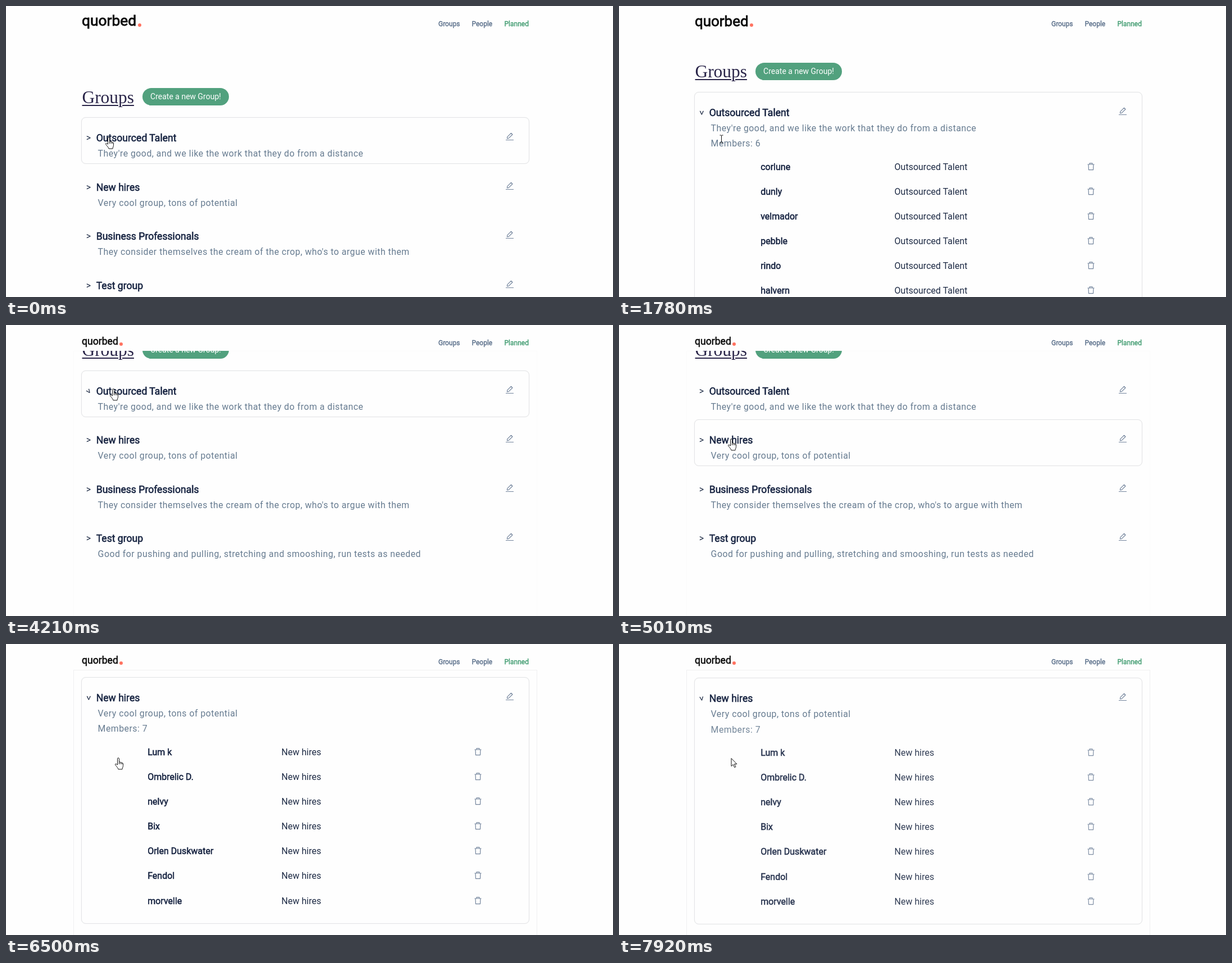
Animation, 1081 px wide and 518 px high, one loop 8 s. Source, as an HTML page:

```html
<!DOCTYPE html>
<html lang="en">
<head>
<meta charset="utf-8">
<title>Groups</title>
<style>
  html, body { margin: 0; width: 100%; height: 100%; overflow: hidden; background: #fefefe; }
  body { position: relative; font: 16px Roboto, sans-serif; color: #1e2b45; }
  body * { position: absolute; white-space: nowrap; box-sizing: border-box; }
  .text { line-height: 20px; margin-top: -10px; }
  .bold { -webkit-text-stroke: .032em currentColor; }
  svg { overflow: visible; fill: none; }

  header { left: 0; top: 0; width: 100%; height: 46px; background: #fefefe; }
  #logo { left: 135px; top: 35.5px; line-height: 0; color: #0a0a0a; }
  #logo span { position: relative; top: -.342em; }
  #logo i { left: calc(100% + 2.5px); top: -5px; width: 6px; height: 6px; border-radius: 50%; background: #ff7361; }
  nav .text { top: 31.5px; font-size: 12px; color: #5a6f8a; }
  nav .text:last-child { color: #3f9b6f; }

  #frame { left: 120px; top: 46px; width: 826px; height: 500px; border: 1px solid #f0f0f1; }
  #page { left: 0; width: 100%; }
  h1 { left: 135.5px; top: 162.5px; margin: -20px 0 0; font: 31.4px/40px "Liberation Serif", serif; color: #2a2549;
       text-decoration: underline 2px; text-underline-offset: 3px; }
  #create { left: 243px; top: 146px; width: 154px; height: 31px; border-radius: 16px; background: #52a17e;
            color: #fff; font-size: 14px; line-height: 30px; text-align: center; }
  .group { left: 134px; width: 798px; border: 1px solid transparent; border-radius: 8px; }
  .group.hover { background: #fefefe; border-color: #e3e4e6; box-shadow: 0 0 2px rgba(0, 0, 0, .05); }
  .group.raised { box-shadow: 0 0 5px rgba(0, 0, 0, .22); }
  .mark { width: 10px; text-align: center; }
  .title { font-size: 17.6px; color: #14213f; }
  .note { font-size: 15.84px; letter-spacing: .5px; color: #667b90; }
  .name { color: #14213f; }
  .icon { stroke: #74859d; stroke-width: 1.2; stroke-linejoin: round; }
</style>
</head>
<body>
<div id="frame"></div>
<main id="page"><h1>Groups</h1><div id="create">Create a new Group!</div></main>
<header>
  <div id="logo"><span class="bold">quorbed</span><i></i></div>
  <nav>
    <div class="text bold" style="left:770px">Groups</div>
    <div class="text bold" style="left:829.5px">People</div>
    <div class="text bold" style="left:887.5px">Planned</div>
  </nav>
</header>
<svg id="pointer" width="1" height="1" stroke="#111"><path/></svg>

<script>
const LOOP = 8000, TOP = 198, ROW = 44.1, CLOSED = 83, GAP = 4.5, NOTCH = 58.7;
const $ = id => document.getElementById(id);

// Groups with members open and close at the given times.
const groups = [
  { title: "Outsourced Talent", note: "They're good, and we like the work that they do from a distance",
    members: ["corlune", "dunly", "velmador", "pebble", "rindo", "halvern"], opens: 830, closes: 4210 },
  { title: "New hires", note: "Very cool group, tons of potential",
    members: ["Lum k", "Ombrelic D.", "nelvy", "Bix", "Orlen Duskwater", "Fendol", "morvelle"], opens: 5440, closes: LOOP },
  { title: "Business Professionals", note: "They consider themselves the cream of the crop, who's to argue with them" },
  { title: "Test group", note: "Good for pushing and pulling, stretching and smooshing, run tests as needed" },
];

const icons = {
  pencil: "M1 13.5h14M3.4 11l.5-3.2L10.4 1.3l2.6 2.5L6.3 10.4Z",
  trash: "M.5 3h12M4 3V.9h5V3M2 3l.5 9.6h8L11 3",
};
const pointers = {
  hand: "M-1.5 12V1.3a1.5 1.5 0 0 1 3 0V7.5a1.5 1.5 0 0 1 2.6.6 1.4 1.4 0 0 1 2.4.8 1.3 1.3 0 0 1 2 1.1V13.5"
      + "c0 3-1.5 4-1.5 6.5H0C-.5 17.5-3 15.5-5.3 12.1c-.8-1.4.8-2.4 2-1.3ZM1.5 7.5V11M4.1 8.1V11M6.5 8.9V11",
  arrow: "M0 .5v14l3.3-3 2.4 5.2 2.2-1-2.4-5h4.4Z",
  beam: "M-1.5-6H.8l.7.7.7-.7H4.5M1.5-5.3V6.7M-1.5 7.4H.8l.7-.7.7.7H4.5",
};

const wheelDown = [1700, 2070, 6000, 6400, 6520];
const wheelUp = [7700, 7910];
const path = [[0, 183, 233.5], [120, 180.5, 235.5], [2650, 180.5, 235.5], [3110, 190.5, 114],
              [4350, 190.5, 114], [4610, 163.5, 203], [4750, 186, 216], [5010, 199.5, 202.5]];

const ramp = (t, start, length) => Math.min(1, Math.max(0, (t - start) / length));
const smooth = u => u * u * (3 - 2 * u);
const wheel = (times, t) => times.reduce((sum, start) => sum + 1 - (1 - ramp(t, start, 260)) ** 4, 0);

function pointerAt(t) {
  const i = path.findLastIndex(p => p[0] <= t);
  const [start, x, y] = path[i], [end, nextX, nextY] = path[i + 1] || [LOOP, x, y];
  const u = smooth(ramp(t, start, end - start));
  return [x + (nextX - x) * u, y + (nextY - y) * u];
}

function pointerKind(t) {
  if (t >= 1780 && t < 1910) return "beam";
  return t < 1780 || (t > 2900 && t < 7010) ? "hand" : "arrow";
}

const text = (cls, str, left, top) =>
  `<div class="text ${cls}" style="left:${left}px;top:${top}px">${str}</div>`;
const icon = (kind, left, top) =>
  `<svg class="icon" width="16" height="16" style="left:${left}px;top:${top}px"><path d="${icons[kind]}"/></svg>`;

function memberRows({ title, members = [] }) {
  return text("note", `Members: ${members.length}`, 28.6, 91.5) + members.map((name, i) => {
    const y = 133 + i * ROW;
    return text("name bold", name, 117.2, y) + text("", title, 355.6, y) + icon("trash", 698.5, y - 8);
  }).join("");
}

for (const group of groups) {
  const el = group.el = document.createElement("section");
  el.className = "group";
  el.innerHTML = text("mark", "&gt;", 7, 36) + text("title bold", group.title, 25.7, 36)
    + text("note", group.note, 28.6, 64) + icon("pencil", 754, 26)
    + `<div class="members">${memberRows(group)}</div>`;
  group.mark = el.querySelector(".mark");
  group.list = el.querySelector(".members");
  $("page").append(el);
}

function draw(t) {
  const scroll = NOTCH * (wheel(wheelDown, t) - wheel(wheelUp, t));
  $("page").style.top = -scroll + "px";
  $("logo").style.fontSize = 26.4 - 8.8 * smooth(ramp(t, 1690, 660)) + "px";
  $("frame").style.opacity = .3 * ramp(t, 2050, 250) + .7 * ramp(t, 5800, 100);

  const [x, y] = pointerAt(t), kind = pointerKind(t), shape = $("pointer").firstElementChild;
  $("pointer").style.left = x + "px";
  $("pointer").style.top = y + "px";
  shape.setAttribute("d", pointers[kind]);
  shape.setAttribute("fill", kind === "beam" ? "none" : "#fff");

  let top = TOP;
  for (const { el, mark, list, members, opens, closes } of groups) {
    const open = t >= opens && t < closes;
    const turn = members ? ramp(t, opens - 100, 250) - ramp(t, closes - 100, 250) : 0;
    const height = CLOSED + (open ? 47.5 + ROW * members.length : 0);
    const hover = y + scroll >= top && y + scroll < top + height;
    el.style.top = top + "px";
    el.style.height = height + "px";
    el.classList.toggle("hover", hover);
    el.classList.toggle("raised", hover && t > opens + 400 && t < opens + 790);
    mark.style.transform = `rotate(${turn * 90}deg)`;
    list.style.display = open ? "block" : "none";
    list.style.opacity = turn;
    top += height + GAP;
  }
}

function tick() {
  draw(performance.now() % LOOP);
  requestAnimationFrame(tick);
}
tick();
</script>
</body>
</html>
```
